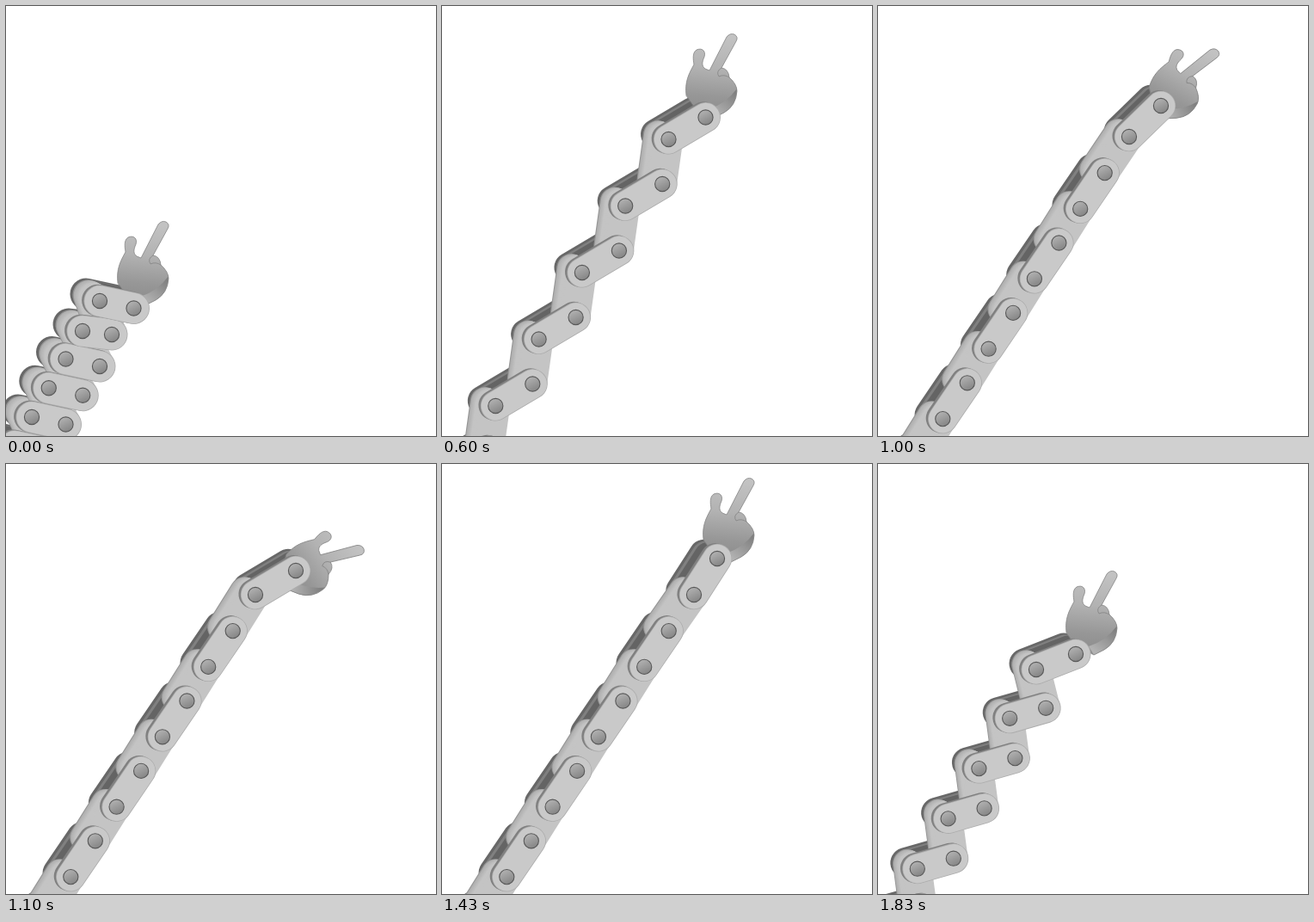
Write an HTML page with a canvas that moves like this. It is 500x500 px and loops after 1.93 s.

```html
<!DOCTYPE html>
<html lang="en">
<head>
<meta charset="utf-8">
<title>Chain arm</title>
<style>
  html, body { margin: 0; width: 100%; height: 100%; overflow: hidden; background: #fff; }
  canvas { display: block; width: 100vw; height: 100vh; }
</style>
</head>
<body>
<canvas id="stage"></canvas>
<script>
const SIZE = 500, LOOP = 1930, LINKS = 5;
const canvas = document.getElementById('stage');
const ctx = canvas.getContext('2d');
const ratio = Math.max(1, window.devicePixelRatio || 1);
canvas.width = canvas.height = SIZE * ratio;
ctx.scale(ratio, ratio);
ctx.lineCap = 'round';

// start: lower-left pin of the top plate, step: to the next plate,
// span: between both pins, fix: plates that leave the regular row [x, y, dx, dy]
const folded = {
  start: [109, 343], step: [-19.75, 33.75], span: [39.5, 8.5], radius: 18.5,
  depth: [-16, -8], hand: [160, 314, 0], fix: { 1: [89, 378, 34, 4] }
};
const opening = {
  start: [189, 237.5], step: [-35.8, 58.3], span: [42, -12], radius: 17.5,
  depth: [-14, -7], hand: [249, 188, 0], fix: { 0: [184, 239, 46, -18] }
};
const rising = {
  start: [263.5, 155], step: [-50.3, 77.5], span: [43, -25.5], radius: 17.5,
  depth: [-15, -6], hand: [314, 96, 0], fix: {}
};
const straight = {
  start: [288.5, 154.5], step: [-53.3, 81.4], span: [28.5, -41.8], radius: 17.2,
  depth: [-15.5, -5], hand: [334, 80, 0], fix: { 0: [293, 152, 27, -42] }
};
const bending = {
  ...straight, hand: [346, 99, 24], topDepth: [-12, -7], fix: { 0: [292, 152, 37, -36] }
};
const pointing = {
  ...straight, hand: [352, 122, 48], topDepth: [-9, -8], fix: { 0: [290, 152, 47, -28] }
};

const timeline = [
  [500, folded], [600, opening], [700, rising], [1000, straight], [1100, bending],
  [1330, pointing], [1430, bending], [1730, straight], [1830, rising], [LOOP, opening]
];

const handShape = new Path2D(
  'M-30 8C-32-8-27-17-21-28C-22-34-23-42-18-45C-11-48-7-43-9-37' +
  'C-12-30-12-26-8-23L-3-21L17-60Q21-65 26-63Q31-60 28-55L11-24' +
  'Q19-23 20-13Q29-5 29 3Q28 20 14 28L2 34L-20 22Z');
const cuffShape = new Path2D('M29 0Q28 20 14 28L2 34L-4 24Q16 18 29 0Z');

const gray = v => `rgb(${v},${v},${v})`;
const shift = ([x, y], [dx, dy], k = 1) => [x + dx * k, y + dy * k];

function capsule(a, b, radius, color) {
  ctx.strokeStyle = color;
  ctx.lineWidth = radius * 2;
  ctx.beginPath();
  ctx.moveTo(...a);
  ctx.lineTo(...b);
  ctx.stroke();
}

function platesOf(pose) {
  return Array.from({ length: LINKS + 1 }, (_, i) => {
    const [x, y, dx, dy] = pose.fix[i] || [...shift(pose.start, pose.step, i), ...pose.span];
    const depth = i === 0 && pose.topDepth || pose.depth;
    return { low: [x, y], high: [x + dx, y + dy], depth };
  });
}

function backPlate({ low, high, depth }, radius) {
  const a = shift(low, depth), b = shift(high, depth);
  capsule(a, b, radius, gray(104));
  capsule(shift(a, [2, 1]), shift(b, [2, 1]), radius - 1, gray(128));
  capsule(shift(a, [5, 2]), shift(b, [5, 2]), radius - 1, gray(100));
}

function innerLink(low, high, depth, radius) {
  const layers = 12;
  for (let i = 0; i <= layers; i++) {
    const k = 0.85 * (1 - i / layers);
    const tone = i ? Math.round(172 + 24 * Math.min(1, i / 6)) : 150;
    capsule(shift(low, depth, k), shift(high, depth, k), radius - 0.7, gray(tone));
  }
}

function frontPlate({ low, high }, radius) {
  const rim = [-2.4, -0.8];
  capsule(shift(low, rim), shift(high, rim), radius, gray(128));
  capsule(low, high, radius, gray(172));
  capsule(low, high, radius - 0.8, gray(201));
}

function pin([x, y]) {
  const shade = ctx.createLinearGradient(x - 4, y - 8, x + 4, y + 8);
  shade.addColorStop(0, gray(178));
  shade.addColorStop(1, gray(132));
  ctx.beginPath();
  ctx.arc(x, y, 8.6, 0, Math.PI * 2);
  ctx.fillStyle = shade;
  ctx.fill();
  ctx.strokeStyle = gray(88);
  ctx.lineWidth = 1.1;
  ctx.stroke();
}

function drawHand([x, y, degrees]) {
  ctx.save();
  ctx.translate(x, y);
  ctx.rotate(degrees * Math.PI / 180);
  const shade = ctx.createLinearGradient(8, -60, 0, 32);
  shade.addColorStop(0, gray(194));
  shade.addColorStop(0.4, gray(178));
  shade.addColorStop(0.75, gray(151));
  shade.addColorStop(1, gray(140));
  ctx.fillStyle = shade;
  ctx.fill(handShape);
  const cuff = ctx.createLinearGradient(26, 4, 4, 30);
  cuff.addColorStop(0, gray(128));
  cuff.addColorStop(1, gray(178));
  ctx.fillStyle = cuff;
  ctx.fill(cuffShape);
  ctx.strokeStyle = gray(132);
  ctx.lineWidth = 0.8;
  ctx.stroke(handShape);
  // folded fingers
  ctx.beginPath();
  ctx.moveTo(11, -24);
  ctx.quadraticCurveTo(4, -20, 8, -14);
  ctx.quadraticCurveTo(14, -17, 20, -13);
  ctx.stroke();
  ctx.restore();
}

function drawPose(pose) {
  const plates = platesOf(pose), r = pose.radius;
  ctx.fillStyle = '#fff';
  ctx.fillRect(0, 0, SIZE, SIZE);
  for (let i = LINKS; i >= 0; i--) backPlate(plates[i], r);
  for (let i = LINKS - 1; i >= 0; i--)
    innerLink(plates[i].low, plates[i + 1].high, pose.depth, r);
  drawHand(pose.hand);
  for (let i = LINKS; i >= 0; i--) {
    frontPlate(plates[i], r);
    pin(plates[i].low);
    pin(plates[i].high);
  }
}

let shown;
function tick() {
  const time = performance.now() % LOOP;
  const pose = timeline.find(([end]) => time < end)[1];
  if (pose !== shown) drawPose(shown = pose);
  requestAnimationFrame(tick);
}
tick();
</script>
</body>
</html>
```
